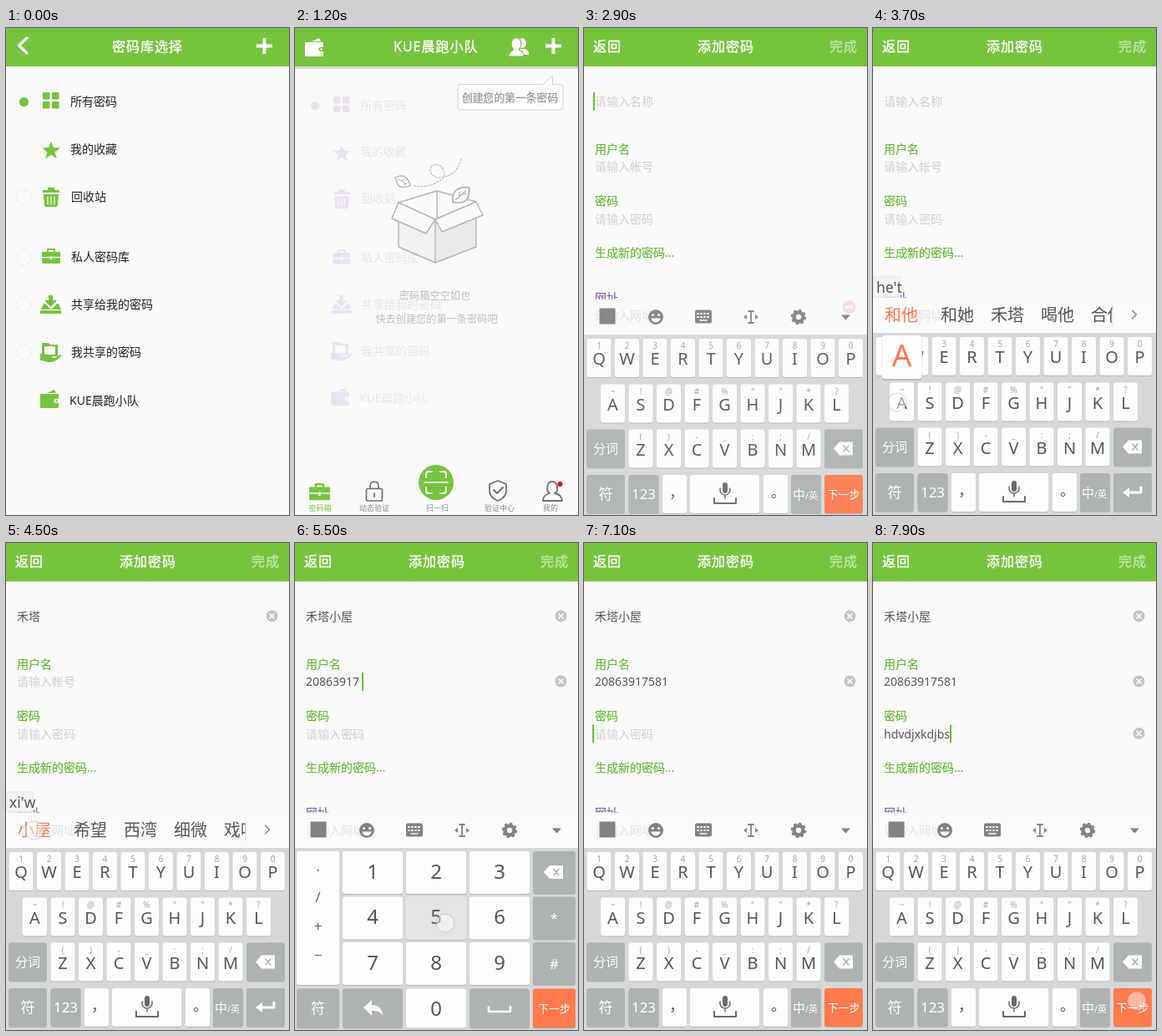
Recreate the animation shown at these times as an HTML page. Size 339 by 583 pixels, loop 8000 ms.

```html
<!DOCTYPE html>
<html lang="zh-CN">
<head>
<meta charset="utf-8">
<title>密码库</title>
<style>
html, body { margin: 0; width: 100%; height: 100%; overflow: hidden; background: #fafafa; }
svg { display: block; width: 339px; height: 583px; color: #76c43e; font-family: "Noto Sans", "Noto Sans CJK SC", "Noto Sans CJK", sans-serif; }
.icon { fill: currentColor; }
.line { fill: none; stroke: currentColor; stroke-linecap: round; stroke-linejoin: round; }
.title { fill: #fff; stroke: #fff; stroke-width: .35; letter-spacing: 1px; }
.mid { text-anchor: middle; }
.label { fill: #5fba2c; stroke: #5fba2c; stroke-width: .15; }
.hint { fill: #cfcfcf; }
.value { fill: #555; }
#rows text { fill: #222; }
#rows.ghost { color: #9b6cc8; }
#rows.ghost text { fill: #888; }
#rows.ghost .radio { display: none; }
</style>
</head>
<body>
<svg id="stage" viewBox="0 0 339 583"></svg>
<script>
const GREEN = '#76c43e', BG = '#fafafa', GRAY = '#aeb2b1', ORANGE = '#ff7a4d';
const TEAM = 'KUE晨跑小队', USER = '20863917581', PASS = 'hdvdjxkdjbs';

const text = (x, y, s, size = 14, attr = '') => `<text x="${x}" y="${y}" font-size="${size}" ${attr}>${s}</text>`;
const mid = (x, y, s, size, fill) => text(x, y, s, size, `class="mid" fill="${fill}"`);
const rect = (x, y, w, h, fill, r = 0, attr = '') => `<rect x="${x}" y="${y}" width="${w}" height="${h}" rx="${r}" fill="${fill}" ${attr}/>`;
const dot = (x, y, r, fill, attr = '') => `<circle cx="${x}" cy="${y}" r="${r}" fill="${fill}" ${attr}/>`;
const shape = (d, fill = 'currentColor') => `<path d="${d}" fill="${fill}"/>`;
const line = (d, w = 1, color = 'currentColor', attr = '') => `<path class="line" d="${d}" stroke-width="${w}" style="stroke:${color}" ${attr}/>`;
const group = (id, body, attr = '') => `<g id="${id}" ${attr}>${body}</g>`;
const at = (x, y, body, k = 1) => `<g transform="translate(${x} ${y}) scale(${k})">${body}</g>`;
const title = (x, s, attr = '') => text(x, 28, s, 16, `class="title" ${attr}`);
const header = rect(0, 0, 339, 46, GREEN);
const plus = rect(300, 19.5, 19, 4, '#fff') + rect(307.5, 12, 4, 19, '#fff');

// Shared icons
const wallet = hole => shape('M0 6q0-1 1-1h20q1 0 1 1v15q0 1-1 1H1q-1 0-1-1zM8 4l9-4 2 4z') +
  shape('M22 11h-3a2.5 2.5 0 0 0 0 5h3z', hole) + dot(19.5, 13.5, 1.3, 'currentColor');
const briefcase = line('M7 4V1h8v3', 2) + shape('M1 4h20q1 0 1 1v12q0 1-1 1H1q-1 0-1-1V5q0-1 1-1z') +
  rect(0, 10, 22, 1.2, BG) + rect(9.5, 9, 3, 4, BG, 1);
const star = [...Array(10)].map((_, i) => {
  const a = i * Math.PI / 5, r = i % 2 ? 4.8 : 11.5;
  return [54 + r * Math.sin(a), 147 - r * Math.cos(a)].map(v => v.toFixed(1));
}).join(' ');

// Library list
const rowText = [[77, 93, '所有密码'], [77, 150, '我的收藏'], [78, 207, '回收站'], [78, 279, '私人密码库'],
  [78, 336, '共享给我的密码'], [78, 393, '我共享的密码'], [76, 451, TEAM]];
const rows = dot(21.5, 88.5, 5.5, 'currentColor') +
  [203, 274.5, 331.5, 388.5].map(y => dot(21.5, y, 9, 'none', 'class="radio" stroke="#ebebeb" stroke-dasharray="5 2"')).join('') +
  [[44, 77], [55, 77], [44, 88], [55, 88]].map(([x, y]) => rect(x, y, 8.5, 8.5, 'currentColor', 1)).join('') +
  `<polygon class="icon" points="${star}"/>` +
  shape('M44 194h6v-3h8v3h6v3H44zM45 199h18l-1 13q0 2-2 2H48q-2 0-2-2z') + line('M50 202v9M54 202v9M58 202v9', 1.3, BG) +
  at(43, 264, briefcase) +
  shape('M51 320h5v6h5l-7.500 8-7.500-8h5zM45 330h2l7 7 7-7h2l3 7H42zM41 338h25v4H41z') +
  shape('M43 377h8l2 2h9v14H43z') + rect(46, 381, 13, 10, BG, 1) +
  shape('M41 390h4c4 0 5 3 9 3 2 0 2 2 0 2h5l6-4c2 0 2 1 0 3-5 5-9 6-13 6-5 0-6-2-11-2z') +
  at(41, 433, wallet(BG)) + rowText.map(r => text(...r)).join('');
const list = rect(0, 0, 339, 583, BG) + header + line('M25 12l-9.500 9 9.500 9', 3.5, '#fff') +
  title(127, '密码库选择') + plus;

// Empty vault
const ink = '#b4b4b4';
const leaf = `<path d="M-9 0C-6-8 2-9 9-8 9 0 7 8-1 8h-8z" fill="${BG}" stroke="${ink}" stroke-width="1.6"/>` +
  line('M-6 5L5-4M-2 2v-5M1-1h5', 1.2, ink);
const carton = line('M143 189c12 2 26-1 34-9 6-8-3-19-11-16-8 4-3 16 8 15 13-1 23-9 25-24', 1.1, ink, 'stroke-dasharray="2 2"') +
  at(129, 184, '<g transform="rotate(70)">' + leaf + '</g>', .85) +
  shape('M124 209L170 195 217 208 168 229z', BG) + shape('M168 229L217 208V262L168 281z', '#e9e9e9') +
  shape('M124 209L168 229V281L124 262z', '#f1f1f1') +
  line('M124 209V262L168 281 217 262V208M168 229V281M124 209L170 195 217 208M170 195V228', 1.4, ink) +
  `<path d="M124 209L116 228 157 246 168 229zM168 229L176 244 225 224 217 208z" fill="${BG}" stroke="${ink}" stroke-width="1.4" stroke-linejoin="round"/>` +
  at(199, 200, leaf, 1.1);
const people = '<ellipse cx="272" cy="18" rx="5" ry="6" fill="#fff"/>' + shape('M266 32c0-5 2-6 4-7h5c3 1 5 2 5 7z', '#fff') +
  `<g stroke="${GREEN}" stroke-width="1.2"><path d="M256 34c0-6 4-7 6-8h6c3 1 6 2 6 8z" fill="#fff"/><ellipse cx="265" cy="19" rx="6" ry="7.500" fill="#fff"/></g>` +
  shape('M262 24h6v5h-6z', '#fff');
const tabs = at(17, 545, briefcase, 1.13) +
  rect(85.5, 551.5, 19, 14.5, 'none', 2, 'stroke="#707070" stroke-width="1.7"') +
  line('M90 551v-3a5 5 0 0 1 10 0v3M95 557v4', 1.7, '#707070') +
  dot(169, 544, 21, GREEN) +
  line('M157 538v-4q0-3 3-3h4M174 531h4q3 0 3 3v4M181 550v4q0 3-3 3h-4M164 557h-4q-3 0-3-3v-4M155 544h28', 1.8, '#fff') +
  line('M243 542l10 4v8c0 6-5 10-10 12-5-2-10-6-10-12v-8zM238 553l4 4 7-7', 1.8, '#707070') +
  line('M305 557c-4-2-4-14 3-14s8 12 3 14c5 1 9 3 9 9h-23c0-6 4-8 8-9z', 1.8, '#707070') + dot(317.5, 546, 3, '#e60000') +
  [[30, '密码箱', GREEN], [95, '动态验证'], [170.5, '扫一扫'], [245, '验证中心'], [306, '我的']]
    .map(([x, s, c = '#8a8a8a']) => mid(x, 578, s, 9, c)).join('');
const vault = rect(0, 0, 339, 583, BG) + rect(0, 46, 339, 3, '#000', 0, 'opacity=".13"') + header +
  `<g color="#fff">${at(12, 12, wallet(GREEN))}</g>` + title(118, TEAM) + people + plus +
  '<path d="M198 67.500H297L308.500 57V67.500H318q3 0 3 3V95q0 3-3 3H198q-3 0-3-3V70.500q0-3 3-3z" fill="#fbfbfb" stroke="#d4d4d4"/>' +
  text(200, 88, '创建您的第一条密码', 12.8, 'fill="#929292" stroke="#929292" stroke-width=".2"') + carton +
  mid(167.500, 324.500, '密码箱空空如也', 12.2, '#bdbdbd') + mid(169.500, 352.500, '快去创建您的第一条密码吧', 12.2, '#bdbdbd') + tabs;

// Form
const fields = { name: { y: 87.5, hint: '请输入名称', gap: 2 }, user: { y: 165.5, hint: '请输入帐号', gap: 4 }, pass: { y: 228, hint: '请输入密码', gap: 1 } };
const clearIcon = y => dot(318.5, y, 7, '#c5c5c5') + line(`M316 ${y - 2.5}l5 5m0-5l-5 5`, 1.6, '#fff');
const label = (y, s, attr = '') => text(13, y, s, 14, `class="label" ${attr}`);
const form = rect(0, 0, 339, 583, BG) + header + title(11, '返回') + title(136, '添加密码') + title(294, '完成', 'opacity=".55"') +
  label(150, '用户名') + label(212, '密码') + label(274, '生成新的密码...') + label(328, '网址', 'id="site"') +
  text(13, 349, '请输入网址', 14, 'class="hint"') +
  Object.entries(fields).map(([id, f]) => text(13, f.y + 5.5, f.hint, 14, `class="hint" id="${id}Hint"`) +
    text(13, f.y + 5.5, '', 14, `class="value" id="${id}"`) + group(id + 'Clear', clearIcon(f.y))).join('') +
  rect(0, 0, 2, 22, '#66bf33', 0, 'id="caret"');

// Keyboards
const keys = {}, pads = {};
const keyBox = (x, y, w, h, fill) => rect(x, y + 1, w, h, '#b4b7b6', 3) + rect(x, y, w, h, fill, 3);
const letters = [['QWERTYUIOP', '1234567890', 3.5, 370], ['ASDFGHJKL', '~!@#%“”*?', 20, 424.5], ['ZXCVBNM', '()-_:;/', 53.5, 478.5]]
  .map(([row, hints, x0, y]) => [...row].map((c, i) => {
    const x = x0 + 33.5 * i;
    keys[c] = [x + 14.5, y + 23];
    return keyBox(x, y, 29, 46, '#fdfdfd') + mid(x + 14.5, y + 12, hints[i], 10, '#a2a2a2') + mid(x + 14.5, y + 31, c, 20, '#555');
  }).join('')).join('');
const grayKey = (x, y, w, h, s = '', size = 15) => keyBox(x, y, w, h, GRAY) + mid(x + w / 2, y + h / 2 + size * .36, s, size, '#fff');
const erase = (x, y) => at(x, y, shape('M-12 0l7-8H11V8H-5z', '#fff') + line('M0-3.500l6 7m0-7l-6 7', 1.6, GRAY));
const next = (x, y, w, h) => keyBox(x, y, w, h, ORANGE) + mid(x + w / 2, y + h / 2 + 5, '下一步', 13, '#fff');
const abc = rect(0, 365, 339, 226, '#d5d8d7') + letters +
  grayKey(3, 478.5, 46, 46, '分词') + grayKey(288, 478.5, 46, 46) + erase(311, 501.5) +
  grayKey(3, 533, 46, 46, '符', 17) + grayKey(53.5, 533, 36, 46, '123', 17) +
  keyBox(94, 533, 29, 46, '#fdfdfd') + text(102, 560, '，', 18, 'fill="#555"') +
  keyBox(127, 533, 83, 46, '#fdfdfd') + rect(166, 542, 6, 13, '#6a6a6a', 3) +
  line('M163 549v2a6 6 0 0 0 12 0v-2M169 557v4', 1.5, '#6a6a6a') + line('M156 561v6h26v-6', 2, '#6a6a6a') +
  keyBox(215, 533, 29, 46, '#fdfdfd') + text(224, 560, '。', 18, 'fill="#555"') +
  grayKey(248, 533, 36, 46) + text(250, 562, '中<tspan font-size="11">/英</tspan>', 15, 'fill="#fff"') +
  group('next', next(288, 533, 46, 46)) +
  group('enter', grayKey(288, 533, 46, 46) + line('M321 550v6H304', 3, '#fff') + shape('M299 556l8-6v12z', '#fff'));
const num = rect(0, 365, 339, 226, '#d5d8d7') + keyBox(2, 369, 51, 160, '#fdfdfd') +
  ['·', '/', '+', '−'].map((c, i) => mid(27.5, [398, 430, 465, 500][i], c, 17, '#666')).join('') +
  [...'1234567890'].map((c, i) => {
    const x = i < 9 ? 57 + 76 * (i % 3) : 133, y = i < 9 ? 369 + 54.5 * Math.floor(i / 3) : 533.5;
    pads[c] = [x + 36, y + 25];
    return keyBox(x, y, 72, i < 9 ? 51 : 47, '#fdfdfd') + rect(x, y, 72, 51, '#e4e4e4', 3, `id="pad${c}"`) + mid(x + 36, y + 32.5, c, 24, '#555');
  }).join('') +
  grayKey(285, 369, 51, 51) + erase(310, 394) + grayKey(285, 423.5, 51, 51, '*', 17) + grayKey(285, 478, 51, 51, '#', 17) +
  grayKey(2, 533.5, 51, 47, '符', 17) + grayKey(57, 533.5, 72, 47) + grayKey(209, 533.5, 72, 47) + next(285, 533.5, 51, 47) +
  shape('M82 556l10-9v6c8 0 12 4 13 12-3-4-7-5-13-5v6z', '#fff') + line('M232 555v6h26v-6', 2.5, '#fff');
const tool = '#828282';
const tools = rect(18.5, 333.5, 19, 19, tool) +
  dot(86, 344, 9, tool) + dot(82.5, 341.5, 1.5, BG) + dot(89.5, 341.5, 1.5, BG) + shape('M80.500 345.500h11a5.500 5 0 0 1-11 0z', BG) +
  rect(133, 335.5, 20, 16, tool, 2) + line('M136 340h14M136 344h14', 2, BG, 'stroke-dasharray="1 3"') + line('M139 348h8', 1.6, BG) +
  line('M197 337h6M200 337v14M197 351h6', 1.8, tool) + shape('M195 341v6l-4-3zM205 341v6l4-3z', tool) +
  `<g fill="none" stroke="${tool}"><circle cx="257" cy="344" r="5.500" stroke-width="4.500"/><circle cx="257" cy="344" r="8" stroke-width="2.500" stroke-dasharray="3.140 3.140"/></g>` +
  shape('M308 341.500h11l-5.500 6z', tool);
const compose = rect(0, 298, 31, 24, '#f4f4f4', 0, 'id="preBox" stroke="#ddd" stroke-width=".7"') +
  '<text id="pre" x="4" y="317" font-size="17.500" fill="#555"></text>' +
  '<clipPath id="cut"><rect x="0" y="323" width="287" height="42"/></clipPath><g id="words" clip-path="url(#cut)"></g>' +
  line('M287 329v28', 1, '#e2e2e2') + line('M310.500 338l5 5-5 5', 1.5, '#8a8a8a');
const board = rect(0, 322.5, 339, 9, BG) + rect(0, 331.5, 339, 33.5, BG, 0, 'fill-opacity=".45"') +
  group('tools', tools) + group('compose', compose) + abc + group('num', num) +
  group('popup', rect(-24, 1, 48, 53, '#bbb', 4) + rect(-24, 0, 48, 52, '#fdfdfd', 4) + mid(0, 37, '', 37, ORANGE));

const stage = document.getElementById('stage');
stage.innerHTML = group('vault', vault) + group('list', list) + group('rows', rows) +
  group('sheet', group('form', form) + group('board', board) +
    group('minus', dot(317.500, 334, 8, '#f08c8c') + rect(312.500, 332.500, 10, 3, '#fff'))) +
  '<circle id="touch" r="11" fill="#fff" fill-opacity=".45" stroke="#9a9ac0" stroke-opacity=".45"/>';
const $ = id => document.getElementById(id);
const show = (id, on) => $(id).style.display = on ? '' : 'none';
const fade = (id, o) => { $(id).style.opacity = o; show(id, o > 0); };
const ramp = (t, a, b) => Math.min(1, Math.max(0, (t - a) / (b - a)));

const words = {
  h: '好 和 后 会 话', he: '和 喝 河 合 何', "he't": '和他 和她 禾塔 喝他 合他', "he'ta": '和他 和她 禾塔 喝他 合他',
  x: '小 想 下 些 新', xi: '系 洗 西 喜 细', "xi'w": '小屋 希望 西湾 细微 戏味'
};
// Each step keeps earlier values; key and touch last one step only.
const steps = [
  [0, { name: '', user: '', pass: '', focus: 'name', pre: '' }],
  [1900, { touch: [314, 16] }], [2200, {}],
  [3100, { key: 'H' }], [3200, { pre: 'h' }], [3300, { key: 'E' }], [3400, { pre: 'he' }],
  [3500, { key: 'T' }], [3600, { pre: "he't" }], [3700, { key: 'A' }], [3800, { pre: "he'ta" }],
  [3900, { touch: [161, 344] }], [4000, { name: '禾塔', pre: '' }],
  [4100, { key: 'X' }], [4200, { pre: 'x', key: 'I' }], [4300, { pre: 'xi', key: 'W' }], [4400, { pre: "xi'w" }],
  [4500, { touch: [34, 344] }], [4600, { name: '禾塔小屋', pre: '' }],
  [4800, { touch: [60, 167] }], [4900, { focus: 'user' }],
  ...[1, 3, 5, 7, 8].map((n, i) => [5100 + 100 * i, { user: USER.slice(0, n), key: USER[n] }]),
  [5600, { user: USER.slice(0, 9) }], [5800, { key: USER[9] }], [5900, { user: USER.slice(0, 10) }],
  [6000, { key: USER[10] }], [6100, { user: USER }],
  [6300, { touch: [60, 229] }], [6400, { focus: 'pass' }], [7300, { key: 'H' }],
  ...[1, 4, 8].map((n, i) => [7500 + 100 * i, { pass: PASS.slice(0, n), key: PASS[n].toUpperCase() }]),
  [7800, { pass: PASS }], [7900, { touch: [316, 548] }]
];
const stateAt = t => steps.reduce((s, [start, change]) => start <= t ? { ...s, key: null, touch: null, ...change } : s, {});

function draw(t) {
  const s = stateAt(t), rise = ramp(t, 2600, 3000), left = 1 - ramp(t, 2600, 3000);
  show('list', t < 1200);
  $('rows').setAttribute('class', t < 1200 ? '' : 'ghost');
  $('rows').setAttribute('transform', t < 1200 ? '' : 'translate(150 322) scale(.98) translate(-150 -322)');
  fade('rows', t < 1200 ? 1 : t < 1300 ? .16 : t < 1400 ? .05 : 0);
  fade('sheet', ramp(t, 2100, 2500));
  fade('board', 1 - left * left);
  fade('minus', left);
  $('board').setAttribute('transform', `translate(0 ${8 * left})`);
  $('site').style.cssText = rise ? 'fill:#7d55a5;stroke:#7d55a5' : '';

  for (const id in fields) {
    $(id).textContent = s[id];
    show(id + 'Hint', !s[id]);
    show(id + 'Clear', s[id]);
  }
  const f = fields[s.focus];
  $('caret').setAttribute('x', s[s.focus] ? 12 + $(s.focus).getComputedTextLength() + f.gap : s.focus === 'pass' ? 10 : 11);
  $('caret').setAttribute('y', f.y - 10.5);
  show('caret', !s.pre);

  show('compose', s.pre);
  show('tools', !s.pre);
  show('enter', s.pre);
  $('pre').textContent = s.pre;
  $('preBox').setAttribute('width', 4 + 7 * Math.max(2, s.pre.length));
  $('words').innerHTML = s.pre ? words[s.pre].split(' ').map((w, i) =>
    text(i ? 21 + 60 * i : 14, 350.5, w, 20, `fill="${i ? '#555' : ORANGE}"`)).join('') : '';

  fade('num', ramp(t, 4800, 5000) * (1 - ramp(t, 6500, 6900)));
  for (const c in pads) show('pad' + c, c === s.key);
  const letter = keys[s.key], pad = pads[s.key];
  show('popup', letter);
  if (letter) {
    $('popup').setAttribute('transform', `translate(${letter[0]} ${letter[1] - 79.5})`);
    $('popup').lastChild.textContent = s.key;
  }
  const p = s.touch || (letter && [letter[0] - 5.5, letter[1] + .5]) || (pad && [pad[0] + 11, pad[1] + 6.5]);
  show('touch', p);
  if (p) $('touch').setAttribute('transform', `translate(${p})`);
}

let last = -1;
const begin = performance.now();
function tick() {
  const t = Math.floor((performance.now() - begin) % 8000 / 100) * 100;
  if (t !== last) draw(last = t);
  requestAnimationFrame(tick);
}
tick();
</script>
</body>
</html>
```
